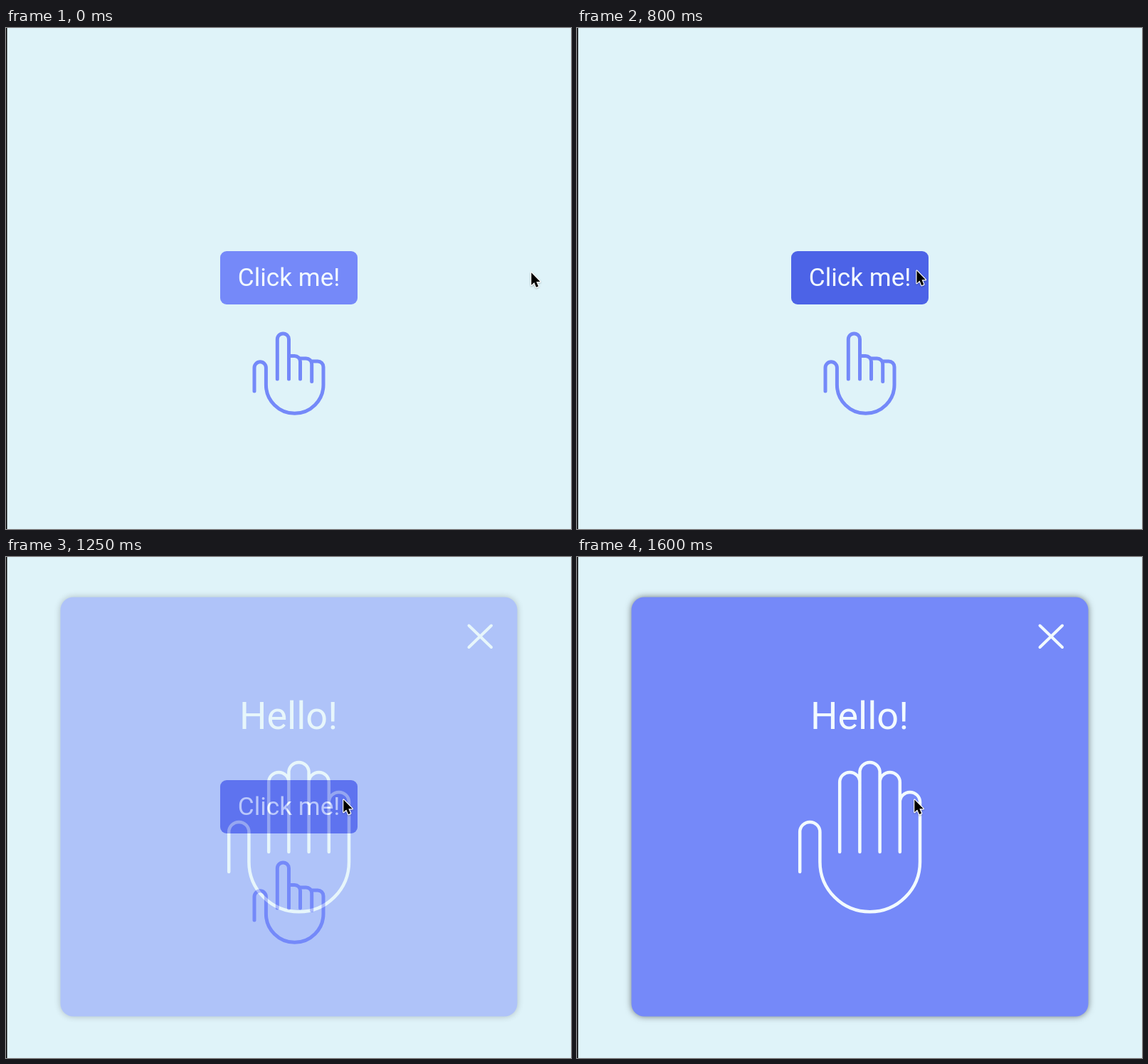
Recreate the animation shown at these times as an HTML page. Size 794 by 705 pixels, loop 2000 ms.

```html
<!DOCTYPE html>
<html lang="en">
<head>
<meta charset="utf-8">
<title>Click me</title>
<style>
  html, body { margin: 0; width: 100%; height: 100%; overflow: hidden; background: #dff3f9; }
  svg { display: block; width: 794px; height: 705px; }
  text { font-family: Roboto, sans-serif; text-anchor: middle; fill: #f2fafe; }
  .line { fill: none; stroke-linecap: round; stroke-linejoin: round; }
  #point { stroke: #7489f9; stroke-width: 5; }
  #popup { opacity: 0; }
  #popup .line { stroke: #f2fafe; stroke-width: 4.5; }
  #panel { fill: #7589f9; filter: drop-shadow(0 0 5px rgba(0, 0, 0, .5)); }
  #arrow { fill: #000; stroke: #fff; stroke-width: 2.4; stroke-linejoin: round; paint-order: stroke;
    filter: drop-shadow(0 1px 1px rgba(0, 0, 0, .25)); }
</style>
</head>
<body>
<svg viewBox="0 0 794 705">
  <rect width="794" height="705" fill="#dff3f9"/>
  <rect width="1.5" height="705" fill="#000"/>

  <rect id="button" x="301" y="314" width="193" height="75" rx="9"/>
  <text x="397.6" y="363.3" font-size="35.2">Click me!</text>
  <path id="point" class="line" d="M349 511V478a8.2 8.2 0 0 1 16.4 0V502a40.3 40.3 0 0 0 80.6 0V477a8 8 0 0 0-8-8H429.7
    M381.3 494V438a8.1 8.1 0 0 1 16.2 0V494
    M397.5 461.5H405.5a8 8 0 0 1 8 8V494
    M413.5 465H421.7a8 8 0 0 1 8 8V497.5"/>

  <g id="popup">
    <rect id="panel" x="76.5" y="56.5" width="642" height="590" rx="18"/>
    <path class="line" style="stroke-width:4" d="M650.5 96.5L682 127M682 96.5L650.5 127"/>
    <text x="397" y="241.5" font-size="54">Hello!</text>
    <path class="line" d="M313.2 443V387a14.1 14.1 0 0 1 28.2 0V429a70.3 70.3 0 0 0 140.6 0V345a14.1 14.1 0 0 0-28.2 0
      M369.2 415V317a14.1 14.1 0 0 1 28.2 0
      M397.4 415V303a14.1 14.1 0 0 1 28.2 0V415
      M425.6 317a14.1 14.1 0 0 1 28.2 0V415"/>
  </g>

  <path id="arrow" d="M0 0V17.6L4 13.9L6.8 20.6L9.8 19.3L7 12.8H12.4Z"/>
</svg>
<script>
  const LOOP = 2000, STEP = 50;
  const [button, popup, arrow] = ['button', 'popup', 'arrow'].map(id => document.getElementById(id));
  const clamp = v => Math.min(1, Math.max(0, v));

  // CSS "ease", cubic-bezier(.25, .1, .25, 1)
  function ease(x) {
    const bez = (s, a, b) => 3 * (1 - s) ** 2 * s * a + 3 * (1 - s) * s * s * b + s ** 3;
    let lo = 0, hi = 1;
    for (let i = 0; i < 24; i++) {
      const mid = (lo + hi) / 2;
      if (bez(mid, .25, .25) < x) lo = mid; else hi = mid;
    }
    return bez(hi, .1, 1);
  }

  function draw(t) {
    const left = clamp(1 - t / 840) ** 1.45;
    const x = 474.3 + 264 * left, y = 341.5 + 2.7 * left;
    arrow.setAttribute('transform', `translate(${x} ${y})`);
    button.setAttribute('fill', x < 494 ? '#4c63e7' : '#7589f9');
    popup.style.opacity = t < 1170 ? 0 : ease(clamp((t - 1170) / 300));
  }

  const start = performance.now();
  function tick() {
    const t = (performance.now() - start) % LOOP;
    draw(Math.floor(t / STEP) * STEP);
    requestAnimationFrame(tick);
  }
  tick();
</script>
</body>
</html>
```
